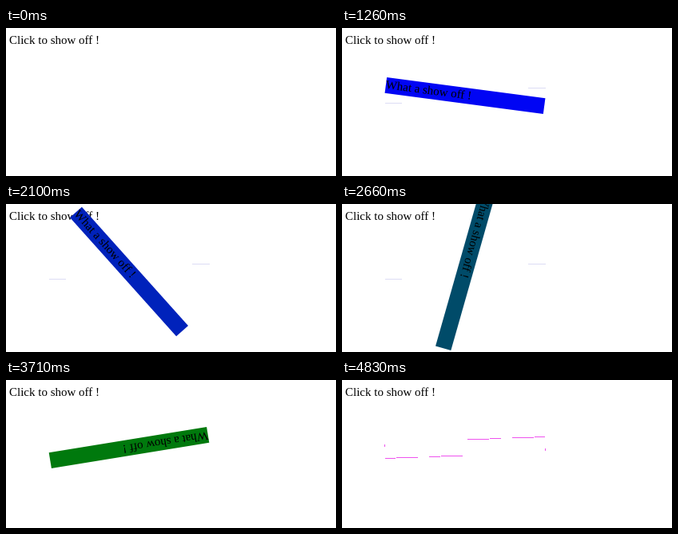
Recreate the animation shown at these times as an HTML page. Size 413 by 186 pixels, loop 4.9 s.

```html
<!DOCTYPE html>
<html lang="en">
<head>
<meta charset="utf-8">
<title>Show off</title>
<style>
  html, body { margin: 0; height: 100%; overflow: hidden; background: #fff; }
  svg { display: block; font: 15px "Liberation Serif", "Times New Roman", serif; }
  #faint { stroke: #dcdcf4; }
  #trail { stroke: #ee52ee; }
</style>
</head>
<body>
<svg width="413" height="186" viewBox="0 0 413 186">
  <text x="4" y="20">Click to show off !</text>
  <path id="faint" d="M54 94.5h21M233 75.5h22"/>
  <g id="trail">
    <path id="edge" d="M157 74.5h27M185 73.5h14M213 72.5h27M241 71.5h13M254.5 86v3"/>
    <use href="#edge" transform="rotate(180 154 85)"/>
  </g>
  <g id="bar">
    <rect id="fill" x="54" y="75" width="200" height="20"/>
    <text x="54" y="89">What a show off !</text>
  </g>
</svg>
<script>
  const LOOP = 4900, STEP = 70, START = 280, DURATION = 4480, END = 4830;
  const [faint, trail, bar, fill] =
    ['faint', 'trail', 'bar', 'fill'].map(id => document.getElementById(id));

  const easeInOutCubic = x => x < 0.5 ? 4 * x ** 3 : 1 - 4 * (1 - x) ** 3;
  const show = (el, on) => el.setAttribute('visibility', on ? 'visible' : 'hidden');

  function draw(now) {
    const t = Math.floor(now % LOOP / STEP) * STEP;
    const x = Math.min(1, Math.max(0, (t - START) / DURATION));
    const p = easeInOutCubic(x);

    show(bar, t >= START && t < END);
    show(faint, t >= 1050 && t < 3600);
    show(trail, t >= END);
    bar.setAttribute('transform', `rotate(${180 * p} 154 85)`);
    fill.setAttribute('fill', `rgb(0, ${Math.round(128 * p)}, ${Math.round(255 * (1 - p))})`);
  }

  const startTime = performance.now();
  function tick() {
    draw(performance.now() - startTime);
    requestAnimationFrame(tick);
  }
  tick();
</script>
</body>
</html>
```
